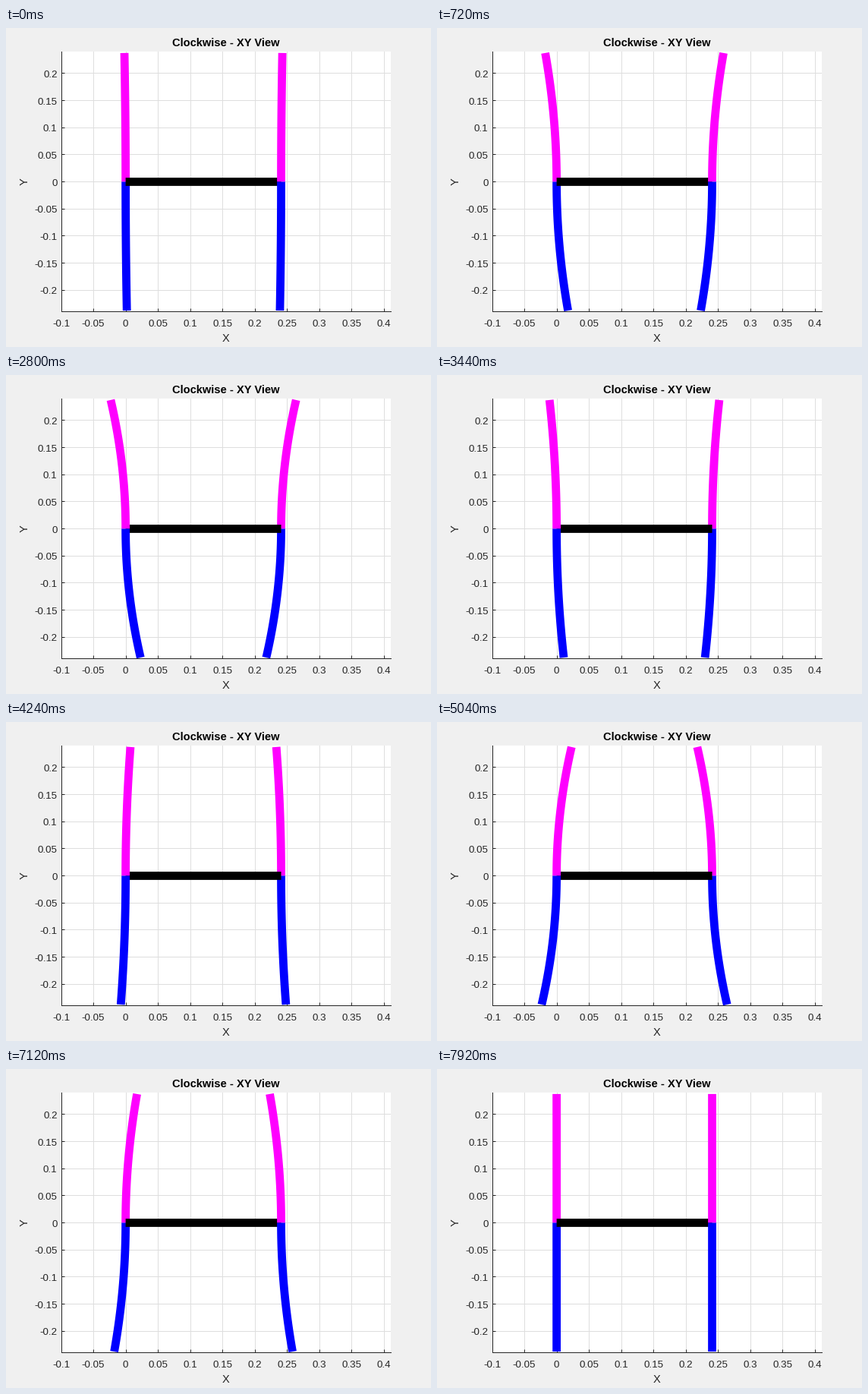
Animation, 560 px wide and 420 px high, one loop 8000 ms. Source, as a matplotlib script:

```python
import numpy as np
import matplotlib.pyplot as plt
from matplotlib.animation import FuncAnimation

W, H, DPI = 560, 420, 80
PX = 72 / DPI                      # points per pixel
FRAMES, INTERVAL = 100, 80
LEFT, TOP, RIGHT, BOTTOM = 72.52, 30.9, 506.52, 373.2

SPAN = 0.2408                      # distance between the two hinges
MID = -0.0006                      # hinge height, centred on a pixel row
REACH = 0.2378                     # vertical reach of each limb
SWING = 0.03                       # sideways travel of a limb's tip
THICK = 10.8 * PX
INK = "#262626"

plt.rcParams["font.family"] = "Liberation Sans"
fig = plt.figure(figsize=(W / DPI, H / DPI), dpi=DPI, facecolor="#f0f0f0")
ax = fig.add_axes([LEFT / W, 1 - BOTTOM / H, (RIGHT - LEFT) / W, (BOTTOM - TOP) / H])
ax.set_xlim(-0.1, 0.41)
ax.set_ylim(-0.24, 0.24)
x_ticks = np.arange(-2, 9) * 0.05
y_ticks = np.arange(-4, 5) * 0.05
ax.set_xticks(x_ticks)
ax.set_yticks(y_ticks)
ax.tick_params(direction="in", length=4 * PX, width=PX, color=INK,
               labelbottom=False, labelleft=False)
ax.set_axisbelow(True)
ax.grid(color="#dedede", linewidth=PX)
for side in ("top", "right"):
    ax.spines[side].set_visible(False)
for side in ("left", "bottom"):
    ax.spines[side].set(color=INK, linewidth=PX)


def label(x, y, text, size=13.33, ha="center", va="baseline", **style):
    """Write text at a pixel position measured from the top left."""
    style.setdefault("color", INK)
    fig.text(x / W, 1 - y / H, text, fontsize=size * PX, ha=ha, va=va, **style)


def tick_text(value):
    return f"{round(value, 2):g}"


for value in x_ticks:
    x = LEFT + (value + 0.1) / 0.51 * (RIGHT - LEFT)
    label(x, 393, tick_text(value))
for value in y_ticks:
    y = (TOP + BOTTOM) / 2 - value / 0.48 * (BOTTOM - TOP)
    label(67.5, y + 5.5, tick_text(value), ha="right")
label(290, 24, "Clockwise - XY View", 14.67, weight="bold", color="black")
label(290, 413, "X", 14.67)
label(25, 202.5, "Y", 14.67, va="center", rotation=90)


def thick_line(color):
    return ax.plot([], [], color=color, linewidth=THICK,
                   solid_capstyle="butt", snap=False)[0]


bar = thick_line("black")
bar.set_data([0, SPAN], [MID, MID])
bar.set_zorder(2.2)

# Each limb: line, hinge x, outward direction, up or down
limbs = [(thick_line(color), hinge, out, up)
         for hinge, out in ((0, -1), (SPAN, 1))
         for color, up in (("magenta", 1), ("blue", -1))]
u = np.linspace(0, 1, 60)


def draw(frame):
    phase = 2 * np.pi * (frame + 1) / FRAMES
    bend = SWING * np.sin(phase)
    depth = np.cos(phase)
    for line, hinge, out, up in limbs:
        line.set_data(hinge + out * up * bend * u ** 2, MID + up * REACH * u)
        line.set_zorder(2.3 if out * depth > 0 else 2.1)
    return [bar] + [limb[0] for limb in limbs]


anim = FuncAnimation(fig, draw, frames=FRAMES, interval=INTERVAL,
                     repeat=True, repeat_delay=0, blit=False)
plt.show()
```
